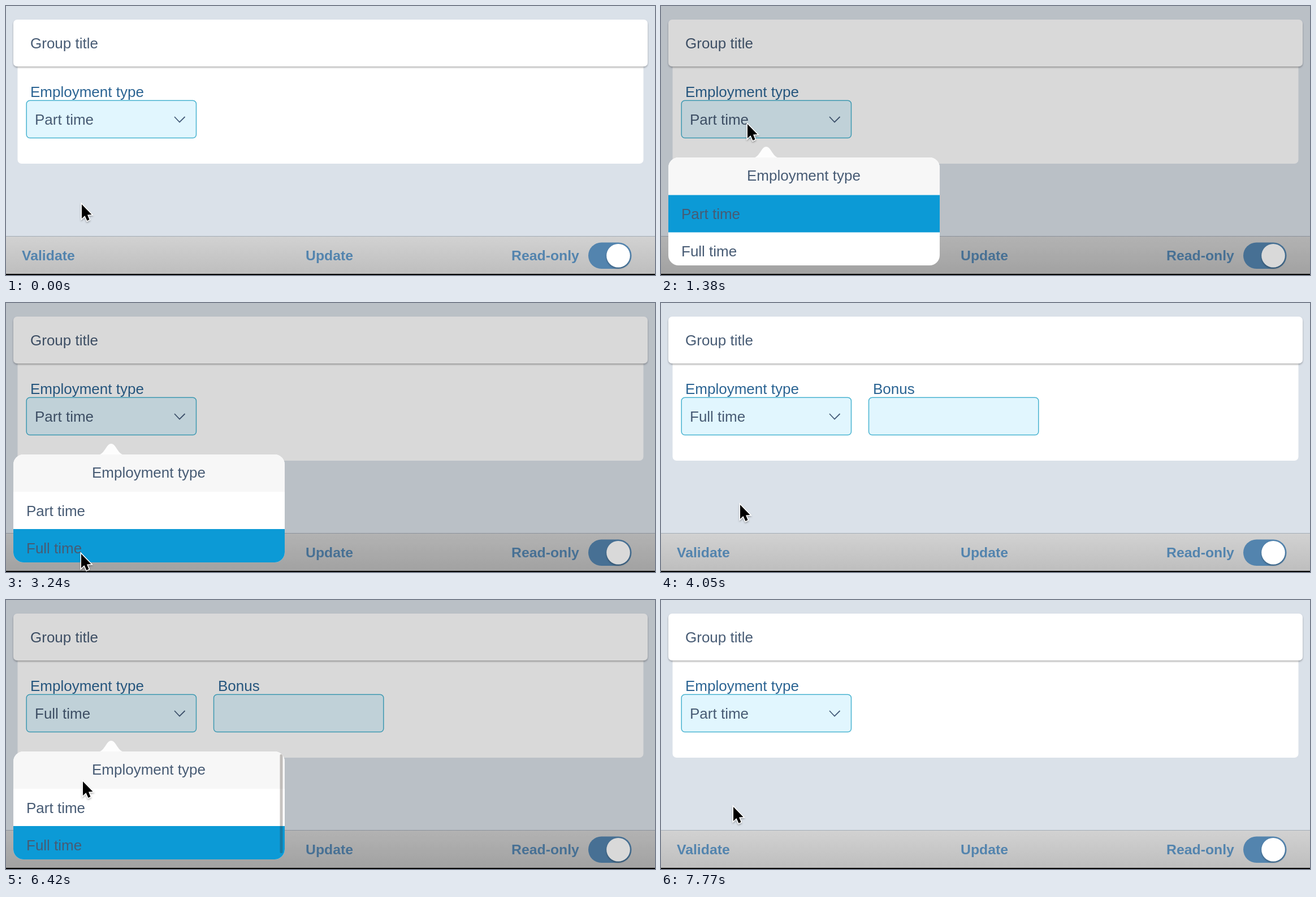
These frames come from a looping animation (1148x476 px, 7.8 s). An HTML page:

```html
<!DOCTYPE html>
<html lang="en">
<head>
<meta charset="utf-8">
<title>Employment form</title>
<style>
  html, body { margin: 0; width: 100%; height: 100%; overflow: hidden; background: #dae1e9; }
  svg { display: block; width: 1148px; height: 476px; }
  text { font: 26px "Liberation Sans", Arial, sans-serif; fill: #475b74; }
  .label { fill: #2b6493; }
  .action { font-size: 24.8px; font-weight: bold; fill: #5384ae; }
  .field { fill: #e1f6fe; stroke: #48b3d0; stroke-width: 1.5; }
  .chevron { fill: none; stroke: #445b7a; stroke-width: 1.8; }
</style>
</head>
<body>
<svg viewBox="0 0 1148 476">
  <defs>
    <linearGradient id="bar" x2="0" y2="1">
      <stop stop-color="#d2d2d2"/><stop offset="1" stop-color="#bebebe"/>
    </linearGradient>
    <filter id="soft" x="-30%" y="-30%" width="160%" height="170%">
      <feDropShadow dx="0" dy="2" stdDeviation="1.5" flood-opacity=".3"/>
    </filter>
    <clipPath id="panel"><rect x="13" y="268" width="480" height="191" rx="18"/></clipPath>
  </defs>

  <rect width="1148" height="476" fill="#dae1e9"/>
  <rect x="20.5" y="90" width="1107" height="189" rx="7" fill="#fff"/>
  <rect x="13" y="24" width="1122" height="83" rx="7" fill="#fff" filter="url(#soft)"/>
  <text x="43" y="74.5">Group title</text>

  <text class="label" x="43" y="161">Employment type</text>
  <rect class="field" x="36.2" y="167.2" width="300.3" height="66.3" rx="6"/>
  <text id="value" x="51" y="209.5">Part time</text>
  <path class="chevron" d="M298 196l9 9.5 9.5-9.5"/>

  <g id="bonus">
    <text class="label" x="375" y="161">Bonus</text>
    <rect class="field" x="367.5" y="167.2" width="300.3" height="66.3" rx="6"/>
  </g>

  <rect y="407" width="1148" height="67" fill="url(#bar)"/>
  <rect y="407" width="1148" height="1" fill="#a3acb6"/>
  <text class="action" x="28" y="450">Validate</text>
  <text class="action" x="530" y="450">Update</text>
  <text class="action" x="894" y="450">Read-only</text>
  <rect x="1030" y="418.5" width="76.5" height="46.5" rx="23.2" fill="#5384ae"/>
  <circle cx="1083" cy="441.7" r="20.8" fill="#fff" filter="url(#soft)"/>

  <g id="popup">
    <rect width="1148" height="474" opacity=".15"/>
    <path d="M162 269C175 268 177 249 186 249S197 268 210 269Z" fill="#fdfdfd"/>
    <g clip-path="url(#panel)">
      <rect x="13" y="268" width="480" height="191" fill="#fff"/>
      <rect x="13" y="268" width="480" height="66" fill="#f7f7f7"/>
      <rect id="pick" x="13" y="334.5" width="480" height="66" fill="#0c9ad6"/>
      <text x="152" y="308.5">Employment type</text>
      <text x="36" y="377">Part time</text>
      <text x="36" y="443">Full time</text>
      <rect id="scroll" x="484.5" y="273" width="5" height="175" rx="2" fill="#32281e" fill-opacity=".28"/>
    </g>
  </g>
  <rect y="474" width="1148" height="2"/>

  <path id="cursor" d="M2 4V29L7.5 24 11.5 33 15.5 31 12 22.5 19.5 22Z"
    stroke="#fff" stroke-width="3" paint-order="stroke" filter="url(#soft)"/>
</svg>
<script>
const LOOP = 7800;
const $ = id => document.getElementById(id);
const ramp = (t, start, length) => Math.min(1, Math.max(0, (t - start) / length));
const smooth = p => p * p * (3 - 2 * p);
// visible between two times, with its own fade lengths
const shown = (t, from, fadeIn, to, fadeOut) =>
  smooth(ramp(t, from, fadeIn)) * (1 - smooth(ramp(t, to, fadeOut)));

// time, x, y of the pointer tip
const path = [
  [0, 132, 347], [180, 132, 347], [810, 151, 205], [1620, 151, 205],
  [2400, 131, 439], [3240, 131, 440], [3420, 131, 440], [3960, 138, 353],
  [4200, 138, 353], [4950, 142, 201], [5790, 142, 201], [6420, 134, 317],
  [6630, 126, 362], [LOOP, 126, 362]
];

function pointer(t) {
  const i = path.findIndex(k => k[0] > t);
  const [t0, x0, y0] = path[i - 1], [t1, x1, y1] = path[i];
  const p = smooth(ramp(t, t0, t1 - t0));
  return [x0 + (x1 - x0) * p, y0 + (y1 - y0) * p];
}

function draw(t) {
  const full = t >= 3360 && t < 6900;
  const pickFull = t >= 2880 && t < 6750;
  $("value").textContent = full ? "Full time" : "Part time";
  $("bonus").style.display = full ? "" : "none";
  $("popup").style.opacity = shown(t, 990, 120, 3300, 420) + shown(t, 5430, 120, 6840, 420);
  $("pick").setAttribute("y", pickFull ? 400 : 334.5);
  $("scroll").style.opacity = shown(t, 5970, 60, 6600, 240);
  $("cursor").setAttribute("transform", `translate(${pointer(t)})`);
}

function frame() {
  draw(performance.now() % LOOP);
  requestAnimationFrame(frame);
}
frame();
</script>
</body>
</html>
```
